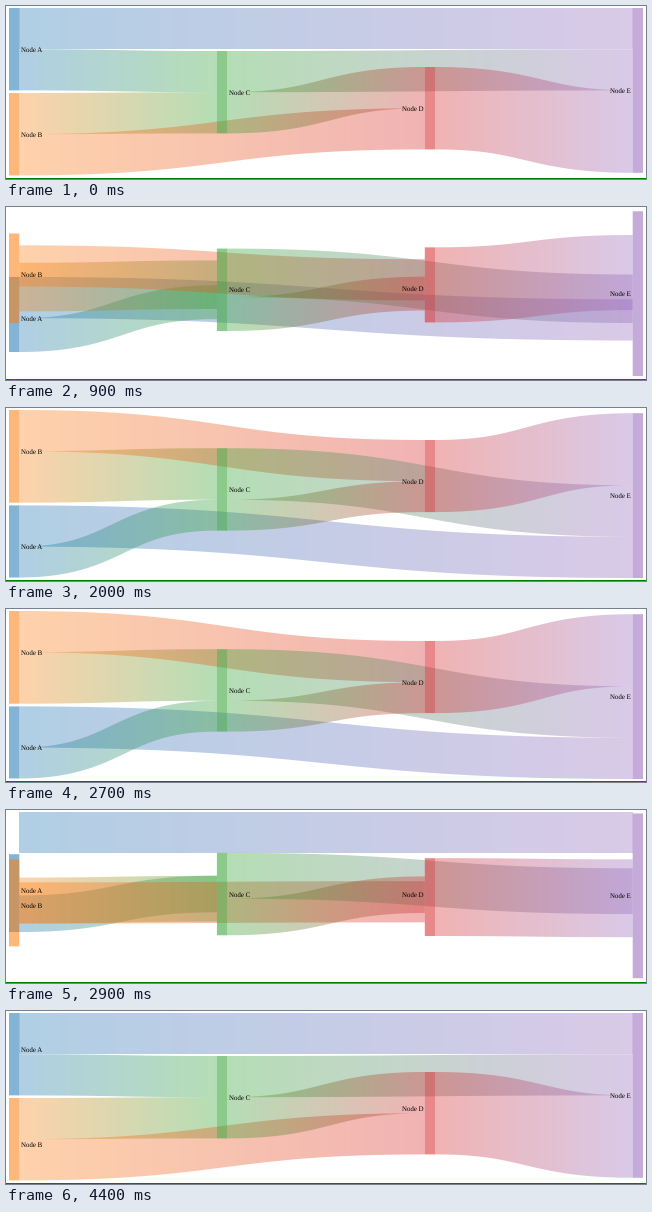
Animation of 640 by 173 pixels, one loop 4500 ms. Source, as a matplotlib script:

```python
import matplotlib.pyplot as plt
import numpy as np
from matplotlib.animation import FuncAnimation
from matplotlib.colors import to_rgb
from matplotlib.patches import Polygon, Rectangle
from matplotlib.path import Path

plt.rcParams["text.hinting"] = "none"

W, H, DPI = 640, 173, 100
STEP, FRAMES = 100, 45
EASE_MS = 250
SWAP_AT, RETURN_AT = 754, 2770
UNIT, NODE_W = 41.2, 10.3
NODE_ALPHA, LINK_ALPHA = 0.55, 0.35

COLORS = dict(A="#1f77b4", B="#ff7f0e", C="#2ca02c", D="#d62728", E="#9467bd")
COLUMN = dict(A=0, B=0, C=1, D=2, E=3)
LEFT = {n: 3 + 207.9 * c for n, c in COLUMN.items()}
LINKS = ["AE", "AC", "BC", "BD", "CE", "CD", "DE"]

# Node tops, link values, and the stacking order of links at each node side
LAYOUTS = [
    dict(tops=dict(A=2, B=87, C=45, D=61, E=2),
         values=dict(AE=1, AC=1, BC=1, BD=1, CE=1, CD=1, DE=2),
         outs=["AE", "AC", "BC", "BD", "CE", "CD", "DE"],
         ins=["AC", "BC", "CD", "BD", "AE", "CE", "DE"]),
    dict(tops=dict(A=97.4, B=2, C=40.2, D=32, E=5.2),
         values=dict(AE=1, AC=.75, BC=1.25, BD=1, CE=1.25, CD=.75, DE=1.75),
         outs=["BD", "BC", "AE", "AC", "CE", "CD", "DE"],
         ins=["BC", "AC", "BD", "CD", "DE", "CE", "AE"]),
]


def stack(layout, order, side):
    """Centre of every link where it meets the node at one of its ends."""
    cursor = dict(layout["tops"])
    centres = {}
    for link in order:
        size = layout["values"][link] * UNIT
        centres[link] = cursor[link[side]] + size / 2
        cursor[link[side]] += size
    return centres


def solve(layout):
    """Nodes as (top, height), links as (start y, end y, width)."""
    values = layout["values"]
    starts = stack(layout, layout["outs"], 0)
    ends = stack(layout, layout["ins"], 1)
    nodes = {}
    for n, top in layout["tops"].items():
        total = sum(v for k, v in values.items() if k[n == "E"] == n)
        nodes[n] = np.array([top, total * UNIT])
    links = {k: np.array([starts[k], ends[k], values[k] * UNIT]) for k in LINKS}
    return nodes, links


STATES = [solve(layout) for layout in LAYOUTS]


def ease(ms):
    t = min(max(ms / EASE_MS, 0), 1)
    return 4 * t ** 3 if t < 0.5 else 1 - 4 * (1 - t) ** 3


def ribbon(x0, x1, y0, y1, width):
    """Outline of a wide S-shaped stroke with horizontal ends."""
    t = np.linspace(0, 1, 60)
    s = 1 - t
    mid = (x0 + x1) / 2
    x = s ** 3 * x0 + 3 * s * t * mid + t ** 3 * x1
    y = y0 + (y1 - y0) * t * t * (3 - 2 * t)
    dx = 1.5 * (x1 - x0) * (s * s + t * t)
    dy = 6 * (y1 - y0) * s * t
    scale = width / 2 / np.hypot(dx, dy)
    offset = np.column_stack([-dy * scale, dx * scale])
    line = np.column_stack([x, y])
    return Path(np.vstack([line - offset, (line + offset)[::-1]]))


fig = plt.figure(figsize=(W / DPI, H / DPI), dpi=DPI, facecolor="white")
ax = fig.add_axes([0, 0, 1, 1])


def link_span(link):
    return LEFT[link[0]] + NODE_W, LEFT[link[1]]


def gradient(link):
    x0, x1 = link_span(link)
    mix = np.linspace(0, 1, int(x1 - x0))[:, None]
    start, end = (np.array(to_rgb(COLORS[n])) for n in link)
    rgba = np.full((1, len(mix), 4), LINK_ALPHA)
    rgba[0, :, :3] = start * (1 - mix) + end * mix
    return ax.imshow(rgba, extent=(x0, x1, H, 0), aspect="auto",
                     interpolation="nearest", zorder=1)


def label(node):
    to_left = node in "DE"
    x = LEFT[node] - 1.7 if to_left else LEFT[node] + NODE_W + 2
    return ax.text(x, 0, f"Node {node}", family="Liberation Serif",
                   size=6.87 * 72 / DPI, color="black", va="baseline",
                   ha="right" if to_left else "left", zorder=3)


bands = {k: gradient(k) for k in LINKS}
bars = {n: ax.add_patch(Rectangle((LEFT[n], 0), NODE_W, 1, lw=0, snap=False,
                                  color=c, alpha=NODE_ALPHA, zorder=2))
        for n, c in COLORS.items()}
labels = {n: label(n) for n in COLORS}
ax.add_patch(Rectangle((0, H - 1), W, 1, color="#008000", lw=0))
ax.set(xlim=(0, W), ylim=(H, 0))
ax.axis("off")


def draw(frame):
    ms = frame * STEP
    returning = ms >= RETURN_AT
    p = 1 - ease(ms - RETURN_AT) if returning else ease(ms - SWAP_AT)
    (nodes_a, links_a), (nodes_b, links_b) = STATES
    # Labels keep the node height from before the current move
    label_nodes = nodes_b if returning else nodes_a

    for n in COLORS:
        top, height = nodes_a[n] * (1 - p) + nodes_b[n] * p
        bars[n].set_y(top)
        bars[n].set_height(height)
        labels[n].set_y(top + label_nodes[n][1] / 2 + 2.4)

    for k in LINKS:
        # The flat top link snaps back at once
        q = 0 if returning and k == "AE" else p
        shape = ribbon(*link_span(k), *(links_a[k] * (1 - q) + links_b[k] * q))
        bands[k].set_clip_path(shape, ax.transData)
    return [*bands.values(), *bars.values(), *labels.values()]


anim = FuncAnimation(fig, draw, frames=FRAMES, interval=STEP,
                     repeat=True, repeat_delay=0, blit=False)
plt.show()
```
